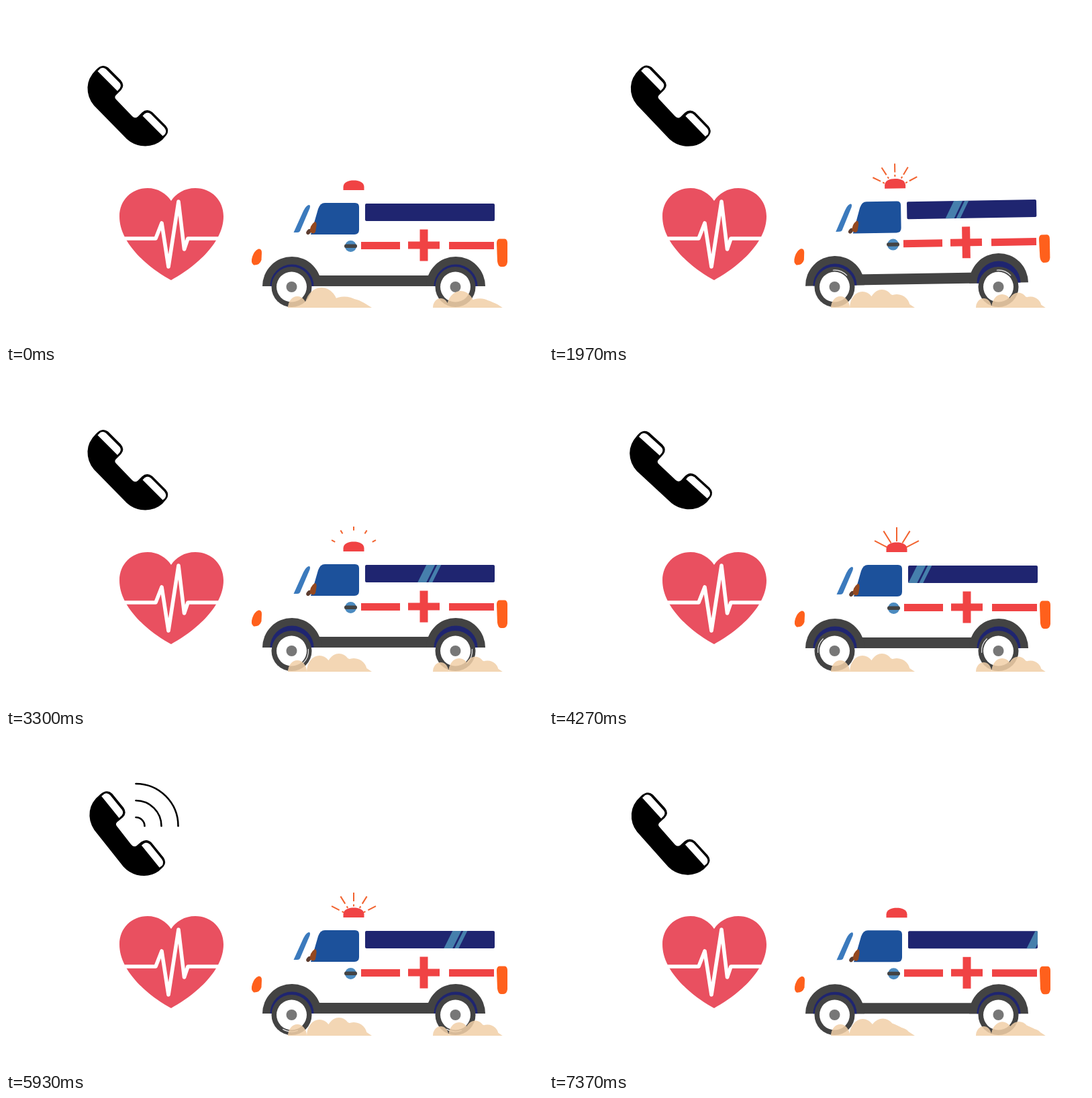
These frames come from a looping animation (800 by 500 pixels, 7.41 s). An HTML page with a canvas:

```html
<!DOCTYPE html>
<html lang="en">
<head>
<meta charset="utf-8">
<title>Emergency call</title>
<style>
  html, body { margin: 0; width: 100%; height: 100%; overflow: hidden; background: #fff; }
  canvas { display: block; width: 800px; height: 500px; }
</style>
</head>
<body>
<canvas id="stage" width="800" height="500"></canvas>
<script>
const ctx = document.getElementById('stage').getContext('2d');
const LOOP = 7410, DRIVE = LOOP / 6, CALL = LOOP / 2, REST = 100;
const GREY = '#434343', NAVY = '#1f2570', RED = '#f04344';

const clamp = v => Math.max(0, Math.min(1, v));
const smooth = v => (1 - Math.cos(Math.PI * clamp(v))) / 2;
const mix = (a, b, k) => a + (b - a) * k;
const rad = d => d * Math.PI / 180;

// keys: [time, value] pairs in order
function track(keys, t, ease = v => v) {
  if (t <= keys[0][0]) return keys[0][1];
  for (let i = 1; i < keys.length; i++) {
    const [t0, v0] = keys[i - 1], [t1, v1] = keys[i];
    if (t <= t1) return mix(v0, v1, ease((t - t0) / (t1 - t0)));
  }
  return keys[keys.length - 1][1];
}

function fill(path, color) {
  ctx.fillStyle = color;
  ctx.fill(typeof path === 'string' ? new Path2D(path) : path);
}

function box(x, y, w, h, r, color) {
  ctx.fillStyle = color;
  ctx.beginPath();
  ctx.roundRect(x, y, w, h, r);
  ctx.fill();
}

function oval(x, y, rx, ry, color, turn = 0) {
  ctx.fillStyle = color;
  ctx.beginPath();
  ctx.ellipse(x, y, rx, ry, turn, 0, 7);
  ctx.fill();
}

function pen(color, width, cap = 'round') {
  ctx.strokeStyle = color;
  ctx.lineWidth = width;
  ctx.lineCap = cap;
  ctx.lineJoin = 'round';
}

// ---- phone ----
const HANDSET = new Path2D('M134 95Q143 85 152 91.5L171 110.5Q177.500 118 171.500 125L163.500 133' +
  'Q161 136 164 139L188 164Q192 168 196 165L202.500 158.500Q210 152 218 158L238 178' +
  'Q244 185 239 192L233 199Q220 210.500 201 208Q189 206 180 198L131 148Q121 136 121.500 121Q122 107 134 95Z');
const EARPIECE = new Path2D('M136.500 97L140.500 93Q145 90.500 149 94L169 114Q172.500 118 169.500 122.500L166 126.500Z');
const MOUTHPIECE = new Path2D('M203.500 163.500L206.500 160.500Q211 157 216 161L235.500 180.500Q240 185.500 237 190.500L233.500 193.500Z');

function phoneTilt(c) {
  const shake = -6 * Math.sin(2 * Math.PI * (c > 3500 ? c - CALL : c) / 525);
  if (c < 1706) return shake;
  if (c < 2700) return mix(-6, 6, smooth((c - 1706) / 490));
  if (c < 3310) return mix(6, 0, smooth((c - 2700) / 550));
  if (c < 3574) return 6 * smooth((c - 3310) / 264);
  return shake;
}

function drawPhone(c) {
  ctx.save();
  ctx.translate(182, 149.5);
  ctx.rotate(rad(phoneTilt(c)));
  ctx.translate(-182, -149.5);
  fill(HANDSET, '#000');
  fill(EARPIECE, '#fff');
  fill(MOUTHPIECE, '#fff');
  ctx.restore();

  pen('#000', 2.6);
  for (let i = 0; i < 3; i++) {
    if (c < 2050 + i * 70 || c > 2760 + i * 70) continue;
    ctx.beginPath();
    ctx.arc(193.5, 137, 13 + 25 * i, -Math.PI / 2, 0);
    ctx.stroke();
  }
}

// ---- heart ----
function drawHeart() {
  fill('M246 408C215 391 169 355 169 313C169 289 187 271 211 271C226 271 239 279 246 290' +
    'C253 279 266 271 282 271C306 271 324 289 324 313C324 355 277 391 246 408Z', '#e95060');
  pen('#fff', 5.6);
  ctx.stroke(new Path2D('M174 346H223L232 323L242 388L257 291L265.500 362L271 346H319'));
}

// ---- ambulance ----
const FRONT = [[0, 0], [35, -8], [130, -4], [240, -1], [390, -5], [565, -3],
  [735, -1], [830, -4], [990, -1], [1195, -.7], [DRIVE, 0]];
const REAR = [[0, 0], [35, -4], [130, -7], [240, -3], [390, -1], [565, -3],
  [735, -5], [830, -4], [990, -1], [1195, -.7], [DRIVE, 0]];
const GLINT = [[0, 400], [300, 470], [565, 535], [735, 592], [830, 613],
  [990, 652], [1195, 711], [DRIVE, 730]];
const SPIN = [[0, 130], [35, 135], [565, 560], [735, 650], [830, 740], [990, 815], [DRIVE, 850]];
const FLASHES = [[0, 270], [510, 360], [870, 265]];

function drawRays(p) {
  const hit = FLASHES.find(([s, d]) => p > s && p < s + d);
  if (!hit) return;
  const u = (p - hit[0]) / hit[1];
  const outer = mix(16, 37, clamp(u / .13));
  const inner = u < .7 ? mix(15, 19, u / .7) : mix(19, 38, (u - .7) / .3);
  pen('#f2632f', 2, 'butt');
  for (const deg of [27, 58, 90, 122, 153]) {
    const x = -Math.cos(rad(deg)), y = -Math.sin(rad(deg));
    const line = (a, b) => {
      ctx.beginPath();
      ctx.moveTo(518 + x * a, 274 + y * a);
      ctx.lineTo(518 + x * b, 274 + y * b);
      ctx.stroke();
    };
    if (u > .4 && u < .75) {
      line(inner - 1, inner + 2);
      line(24, outer);
    } else line(inner, outer);
  }
}

function drawGlint(p) {
  const x = track(GLINT, p);
  ctx.save();
  ctx.beginPath();
  ctx.rect(535, 294, 193, 26);
  ctx.clip();
  for (const [dx, w] of [[0, 13], [16, 6]])
    fill(`M${x + dx} 320l13 -26h${w}l-13 26Z`, '#467fac');
  ctx.restore();
}

function drawBody(p) {
  const front = track(FRONT, p, smooth), rear = track(REAR, p, smooth);
  ctx.save();
  ctx.translate(547.5, 417 + (front + rear) / 2);
  ctx.rotate(Math.atan2(rear - front, 244));
  ctx.translate(-547.5, -417);

  drawRays(p);
  fill('M502.500 274V269C503 262 510 259.500 518 259.500S533 262 533.500 269V274Z', RED);

  // windows
  fill('M428.500 337L443 305Q447 297 451 296Q454 296 452.500 301L438 335Q437 337 434 337Z', '#3b7abd');
  fill('M454 340L465 302Q468 293 475 293H520Q526 293 526 299V333Q526 340 519 340Z', '#1c519b');
  oval(451, 336, 3, 4.5, '#5d3d30', .7);
  fill('M460 321Q463 321 462.500 327L461 336Q458 341 453 336Q452 327 460 321Z', '#94481f');
  box(535, 294, 193, 26, 2, NAVY);
  drawGlint(p);

  // markings
  oval(513.5, 357.5, 8.5, 8.5, '#4c8bc0');
  box(504, 354.5, 19, 5.5, 2.5, GREY);
  box(529, 351, 58, 11, 0, RED);
  box(660, 351, 67, 11, 0, RED);
  box(599, 350.5, 47, 11, 0, RED);
  box(616.5, 332.5, 12, 47, 0, RED);
  fill('M735 346.500H743Q747 347 747 353V381Q746 388 741 388H737Q733 387 732 380L731 353Q731 347 735 346.500Z', '#ff601c');
  fill('M376 361.500Q381 361 381 367L380.500 378Q378 386 369 385.500Q364 382 367 373Q370 364 376 361.500Z', '#ff601c');

  // chassis and wheel arches
  box(455, 401, 185, 16, 0, GREY);
  for (const x of [426, 670]) {
    ctx.fillStyle = GREY;
    ctx.beginPath();
    ctx.arc(x, 417, 44, Math.PI, 0);
    ctx.fill();
    ctx.fillStyle = NAVY;
    ctx.beginPath();
    ctx.arc(x, 417, 32.5, Math.PI, 0);
    ctx.fill();
  }
  ctx.restore();
}

function drawWheel(x, p) {
  const y = 418;
  oval(x, y, 30, 30, GREY);
  oval(x, y, 22.5, 22.5, '#fff');
  oval(x, y, 8, 8, '#777');
  if (p < 15 || p > 1150) return;
  const a = rad(track(SPIN, p));
  pen('#ddd', 1.4);
  ctx.beginPath();
  ctx.arc(x, y, 25, a - .45, a + .45);
  ctx.stroke();
}

// dust humps: position, half width and height, each from settled to blown up
function drawDust(x, scale, p) {
  const k = p < 600 ? smooth((p - 60) / 480) : 1 - .15 * smooth((p - 1000) / 200);
  const settle = smooth((p - 1000) / 190);
  const humps = [
    [14, 14, 17], [mix(50, 47, k), mix(25, 19, k), mix(30, 24, k)],
    [mix(84, 76, k), mix(24, 20, k), mix(16.5, 27, k)],
    [98, 20, mix(mix(11, 20, k), 13, settle)]
  ];
  const path = new Path2D();
  for (const [hx, w, h] of humps) {
    path.moveTo(hx - w, 0);
    path.ellipse(hx, 0, w, h, 0, Math.PI, 2 * Math.PI);
    path.closePath();
  }
  path.moveTo(60, 0);
  path.lineTo(84, -mix(16, 22, k));
  path.quadraticCurveTo(104, -15, 125, 0);
  path.closePath();
  ctx.save();
  ctx.translate(x, 449);
  ctx.scale(scale, scale);
  ctx.beginPath();
  ctx.rect(0, -40, 126, 40);
  ctx.clip();
  fill(path, 'rgba(242,208,168,.86)');
  ctx.restore();
}

function draw(t) {
  const p = t % DRIVE;
  ctx.fillStyle = '#fff';
  ctx.fillRect(0, 0, 800, 500);
  drawPhone(t % CALL);
  drawHeart();
  drawBody(p);
  drawWheel(425.5, p);
  drawWheel(669.5, p);
  drawDust(420, 1, p);
  drawDust(636, .83, p);
}

const start = performance.now();
function tick() {
  const t = (performance.now() - start) % LOOP;
  draw(t < REST ? 0 : t);
  requestAnimationFrame(tick);
}
tick();
</script>
</body>
</html>
```
